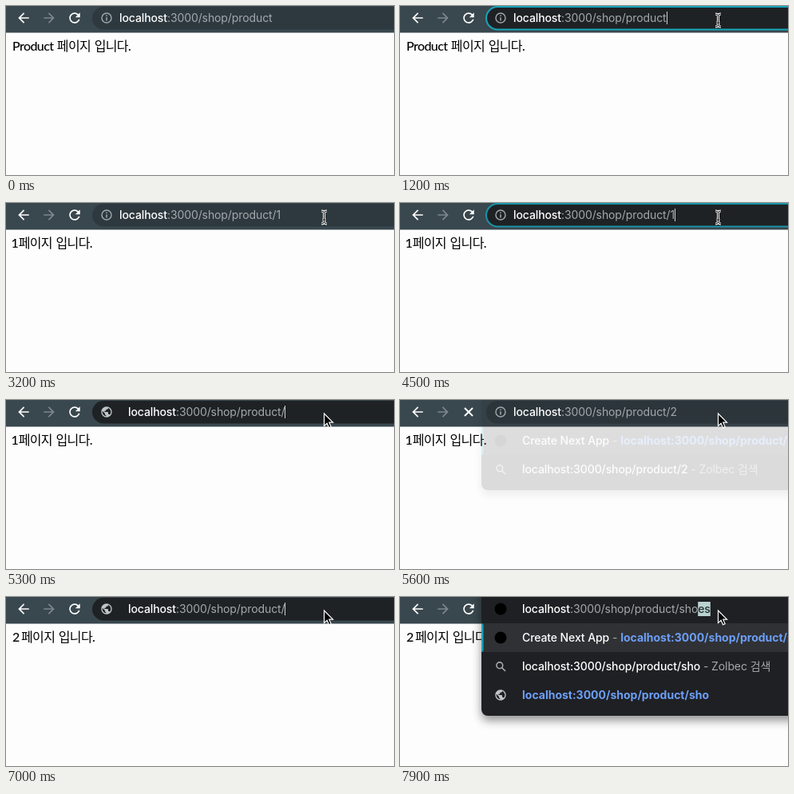
An HTML page for the animation above (8000 ms loop, 486 by 212 pixels).

```html
<!DOCTYPE html>
<html lang="ko">
<head>
<meta charset="utf-8">
<title>Dynamic routes in the address bar</title>
<style>
  html, body { margin: 0; width: 100%; height: 100%; overflow: hidden; background: #fdfdfd; }
  svg { display: block; width: 486px; height: 212px; }
  text { font: 500 14px Inter, "Noto Sans CJK KR", sans-serif; letter-spacing: -.1px; white-space: pre; fill: #fff; }
  .dim { font-weight: 400; fill: #a3a9ad; }
  .link { font-weight: 400; fill: #6c9ff8; }
  .bold { font-weight: 700; letter-spacing: 0; }
  #page { font: 500 16px Lato, "Noto Sans CJK KR", sans-serif; letter-spacing: -.6px; word-spacing: 1px; fill: #000; }
  #shade { filter: drop-shadow(0 6px 6px rgba(0, 0, 0, .42)); }
</style>
</head>
<body>
<svg viewBox="0 0 486 212">
  <defs>
    <g id="info">
      <circle r="6" fill="none" stroke="#a0a9ae" stroke-width="1.4"/>
      <path d="M0-.8V3.4M0-3.4V-2" stroke="#a0a9ae" stroke-width="1.5"/>
    </g>
    <path id="globe" transform="scale(.667) translate(-12 -12)" fill="#c0c5c8" d="M12 2C6.48 2 2 6.48 2 12s4.48 10 10 10 10-4.48 10-10S17.52 2 12 2zm-1 17.93c-3.95-.49-7-3.85-7-7.93 0-.62.08-1.21.21-1.79L9 15v1c0 1.1.9 2 2 2v1.93zm6.9-2.54c-.26-.81-1-1.39-1.9-1.39h-1v-3c0-.55-.45-1-1-1H8v-2h2c.55 0 1-.45 1-1V7h2c1.1 0 2-.9 2-2v-.41c2.93 1.19 5 4.06 5 7.41 0 2.08-.8 3.97-2.1 5.39z"/>
    <circle id="dot" r="7.5" fill="#000"/>
    <g id="glass" fill="none" stroke="#a4a9ad" stroke-width="1.6">
      <circle cx="-1.2" cy="-1.2" r="3.9"/><path d="M1.6 1.6 6 6"/>
    </g>
    <path id="arrow" d="M0 0V15.5L3.6 12.2 6 17.7 8.6 16.6 6.3 11.2H11Z" fill="#000" stroke="#fff" stroke-width="1.2"/>
    <g id="beam" fill="none">
      <path d="M-3.5-8Q0-8 0-5.5Q0-8 3.5-8M-3.5 8Q0 8 0 5.5Q0 8 3.5 8M0-6V6M-2 3H2" stroke="#fff" stroke-width="3"/>
      <path d="M-3.5-8Q0-8 0-5.5Q0-8 3.5-8M-3.5 8Q0 8 0 5.5Q0 8 3.5 8M0-6V6M-2 3H2" stroke="#111"/>
    </g>
    <path id="back" d="M20 11H7.83l5.59-5.59L12 4l-8 8 8 8 1.41-1.41L7.83 13H20z"/>
    <path id="reload" d="M17.65 6.35C16.2 4.9 14.21 4 12 4c-4.42 0-8 3.58-8 8s3.58 8 8 8c3.73 0 6.84-2.55 7.73-6h-2.08c-.82 2.33-3.04 4-5.65 4-3.31 0-6-2.69-6-6s2.69-6 6-6c1.66 0 3.14.69 4.22 1.78L13 11h7V4z"/>
    <path id="stop" d="M6 6 18 18M18 6 6 18" stroke="#fff" stroke-width="2.3"/>
  </defs>

  <rect width="486" height="212" fill="#fdfdfd"/>
  <text id="page" y="55.5"></text>
  <rect width="486" height="33.5" fill="#39474e"/>
  <use href="#back" transform="translate(22 15) scale(.84) translate(-12 -12)" fill="#fff"/>
  <use href="#back" transform="translate(54 15) scale(-.84 .84) translate(-12 -12)" fill="#7c878d"/>
  <use id="nav" transform="translate(86 15) scale(.84) translate(-12 -12)" fill="#fff"/>
  <rect id="field" x="108" y="1" width="420" height="28.5" rx="14.25"/>
  <rect id="ring" x="108" y="1" width="420" height="28.5" rx="14.25" fill="none" stroke="#16a5ba" stroke-width="2"/>
  <g id="popup">
    <rect id="shade" x="102" y="-20" width="430" rx="8" fill="#1f2023"/>
    <path d="M102 33H486V69H102Z" fill="#303134"/>
    <path d="M102 33Q104.5 33 104.5 36V66Q104.5 69 102 69Z" fill="#16a5ba"/>
    <g id="rows"></g>
  </g>
  <use id="site" x="126" y="15"/>
  <rect id="mark" y="6" height="18" fill="#b9d2d2"/>
  <text id="url" y="20"></text>
  <rect id="caret" y="7" width="1" height="16" fill="#cdd2d4"/>
  <use id="mouse"/>
</svg>
<script>
const LOOP = 8000, TICK = 100;
const HOST = 'localhost', PATH = ':3000/shop/product', FULL = HOST + PATH;
const $ = id => document.getElementById(id);
const span = (cls, s) => `<tspan class="${cls}">${s}</tspan>`;

// Suggestion rows: [icon, markup]
const app = tail => ['dot', 'Create Next App' + span('dim', ' - ') + span('link bold', FULL + tail)];
const search = tail => ['glass', FULL + tail + span('dim', ' - Zolbec 검색')];
const link = (icon, tail, rest = '') => [icon, span('link bold', FULL + tail) + span('link', rest)];

const history = [app('/1'), search('/'), app('/2'), app('/shoes'), link('dot', '/', 'krit')];
const exact = n => [app('/' + n), search('/' + n)];
const shoes = part => [app('/shoes'), search('/' + part), link('globe', '/' + part)];

const idle = { sel: '', site: 'info', ring: 0, dark: 0, caret: 0, pop: 0, mouse: 'beam', nav: 'reload' };
const focus = { ring: .85, dark: 1, caret: 1 };
const edit = { tail: '/', site: 'globe', ring: 0, dark: 1, caret: 1, mouse: 'arrow' };
const open = { pop: .95, rows: history, site: 'dot' };
const enter = { ...idle, pop: .15, nav: 'stop', mouse: 'arrow' };
const typed = n => ({ tail: '/' + n, sel: '', site: 'dot', caret: 1, pop: 1, rows: exact(n) });
const fill = part => ({ tail: '/' + part, sel: 'shoes'.slice(part.length), caret: 0, rows: shoes(part) });

// Each step changes only what it names
const steps = [
  [0, { ...idle, tail: '', page: 'Product', mouse: '', rows: history }],
  [400, { mouse: 'arrow' }],
  [1000, { ...focus, mouse: 'beam' }], [1100, { ring: .93 }], [1200, { ring: 1 }],
  [2000, { caret: 0 }],
  [2200, edit], [2300, { ...open, sel: '1', caret: 0 }], [2400, { pop: 1 }], [2500, typed(1)],
  [2800, enter], [2900, { pop: 0, mouse: 'beam' }], [3000, { page: '1' }], [3200, { nav: 'reload' }],
  [4500, focus], [4600, { ring: .92 }], [4700, { ring: .97 }], [4800, { ring: 1 }],
  [5000, { caret: .5 }], [5100, { caret: 0 }],
  [5300, edit], [5400, open], [5500, typed(2)],
  [5600, enter], [5700, { pop: 0, mouse: 'beam' }], [5800, { page: '2' }], [6000, { nav: 'reload' }],
  [6300, focus], [6400, { ring: .9 }], [6500, { ring: .94 }], [6600, { ring: .97 }], [6700, { ring: 1 }],
  [7000, edit], [7100, open], [7200, { pop: 1 }],
  [7300, fill('s')], [7500, fill('sh')], [7700, fill('sho')]
];

const set = (id, attrs) => {
  for (const k in attrs) $(id).setAttribute(k, attrs[k]);
};

function mouseAt(t, kind) {
  const p = Math.min(1, Math.max(0, (t - 400) / 600));
  const e = p * p * (3 - 2 * p);
  const x = 54.5 + 344 * e, y = 150 - 133 * e;
  return kind === 'beam' ? [x, y + 1] : [x, y];
}

function drawPage(name) {
  // Digits are set tighter than their tabular width
  const tight = { 1: [6.5, -4], 2: [8, -2.2] };
  const [x, dx] = tight[name] || [8, 0];
  $('page').innerHTML = `<tspan x="${x}">${name}</tspan><tspan dx="${dx}"> 페이지 입니다.</tspan>`;
}

function drawUrl(s) {
  const url = $('url'), head = (FULL + s.tail).length;
  url.setAttribute('x', s.site === 'info' ? 142 : 153);
  url.innerHTML = HOST + span('dim', PATH + s.tail) + (s.sel && `<tspan fill="#24302f">${s.sel}</tspan>`);
  const end = url.getEndPositionOfChar(head - 1).x;
  const last = url.getEndPositionOfChar(head + s.sel.length - 1).x;
  set('mark', { x: end, width: Math.max(0, last - end) });
  set('caret', { x: Math.round(end), opacity: s.caret });
}

function drawPopup(s) {
  set('popup', { opacity: s.pop });
  set('shade', { height: 61 + 36 * s.rows.length });
  $('rows').innerHTML = s.rows.map(([icon, label], i) => {
    const y = 51 + 36 * i;
    return `<use href="#${icon}" x="126" y="${y}"/><text x="153" y="${y + 5}">${label}</text>`;
  }).join('');
}

function draw(t) {
  const s = Object.assign({}, ...steps.filter(([at]) => at <= t).map(step => step[1]));
  const [x, y] = mouseAt(t, s.mouse);
  drawPage(s.page);
  drawUrl(s);
  drawPopup(s);
  set('nav', { href: '#' + s.nav });
  set('field', { fill: s.dark ? '#1f2225' : '#2e393f' });
  set('ring', { opacity: s.ring });
  set('site', { href: '#' + s.site });
  set('mouse', { href: '#' + s.mouse, x, y, visibility: s.mouse ? 'visible' : 'hidden' });
}

const start = performance.now();
let shown = -1;
function frame() {
  const t = Math.floor((performance.now() - start) % LOOP / TICK) * TICK;
  if (t !== shown) draw(shown = t);
  requestAnimationFrame(frame);
}
frame();
</script>
</body>
</html>
```
